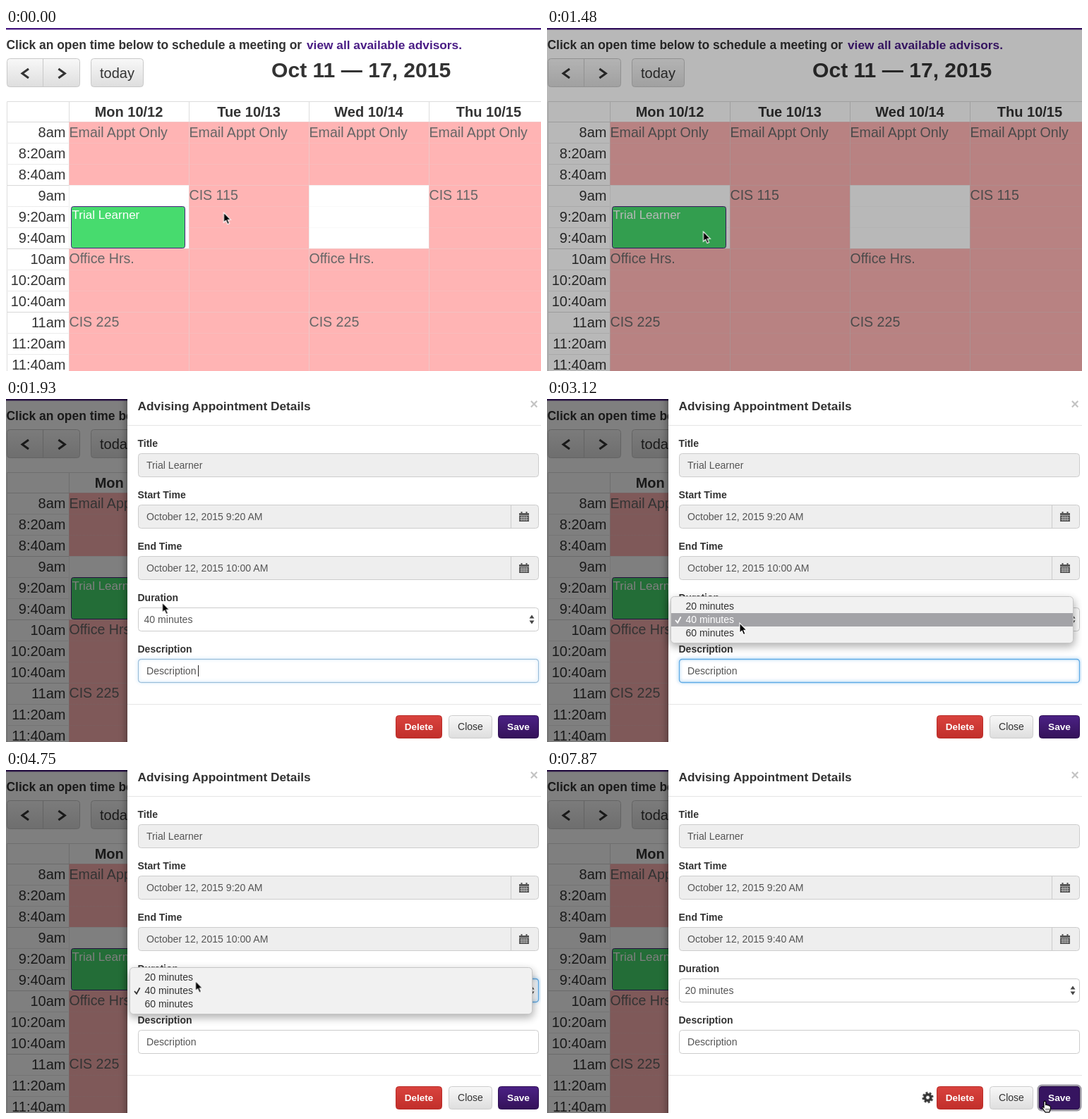
Recreate the animation shown at these times as an HTML page. Size 758 by 487 pixels, loop 8 s.

```html
<!DOCTYPE html>
<html lang="en">
<head>
<meta charset="utf-8">
<title>Advising calendar</title>
<style>
html, body { margin: 0; width: 100%; height: 100%; overflow: hidden; background: #fff; }
svg { display: block; width: 758px; height: 487px; font: 14px "Liberation Sans", Arial, sans-serif; }
text { fill: #333; white-space: pre; }
.b { font-weight: bold; }
.mid { text-anchor: middle; }
.end { text-anchor: end; }
.big { font-size: 20px; }
.busy { font-size: 19.6px; fill: #666; }
.value { font-size: 14.1px; fill: #555; }
.white text, text.white { fill: #fff; }

/* 54 ticks per 8 s loop; every part changes only on a tick */
.a { animation: 8s step-end -15ms infinite; }
#arrow { animation-name: arrow; }
#hand, #saveHover { animation-name: hover; }
#dim { animation-name: dim; }
#modal { animation-name: modal; }
#caret { animation-name: caret; }
#descRing { animation-name: descRing; }
#selRing { animation-name: selRing; }
#popup { animation-name: popup; }
#hi0 { animation-name: hi0; }
#hi1 { animation-name: hi1; }
#hi2 { animation-name: hi2; }
.old { animation-name: old; }
.new { animation-name: new; }
#saveRing { animation-name: saveRing; }
#gear { animation-name: gear; }
#cog { animation: spin 8s steps(54) -15ms infinite; }

@keyframes arrow {
  0% { transform: translate(308.5px, 262px); }
  1.85% { transform: translate(296px, 266px); }
  3.7% { transform: translate(263px, 277px); }
  5.56% { transform: translate(236px, 286px); }
  7.41% { transform: translate(223px, 290px); }
  9.26% { transform: translate(221.5px, 289px); }
  25.93% { transform: translate(228px, 293px); }
  27.78% { transform: translate(250px, 305px); }
  29.63% { transform: translate(268px, 316px); }
  31.48% { transform: translate(273px, 318px); }
  44.44% { transform: translate(272px, 324px); }
  46.3% { transform: translate(270px, 325px); }
  48.15% { transform: translate(270px, 318px); }
  50% { transform: translate(268px, 306px); }
  51.85% { transform: translate(268px, 301px); }
  53.7% { transform: translate(268.5px, 299.5px); }
  64.81% { transform: translate(310px, 318px); }
  66.67% { transform: translate(440px, 370px); }
  68.52% { transform: translate(590px, 430px); }
  70.37% { transform: translate(688px, 465px); }
  72.22% { transform: translate(704px, 470px); opacity: 1; }
  74.07%, 100% { transform: translate(704px, 470px); opacity: 0; }
}
@keyframes hover { 0% { opacity: 0; } 74.07%, 100% { opacity: 1; } }
@keyframes dim { 0% { opacity: 0; } 18.52% { opacity: .28; } 20.37%, 100% { opacity: .5; } }
@keyframes modal {
  0% { opacity: 0; transform: translateY(-122px); }
  20.37% { opacity: .6; transform: translateY(-60px); }
  22.22% { opacity: 1; transform: translateY(-8px); }
  24.07%, 100% { opacity: 1; transform: none; }
}
@keyframes caret { 0% { opacity: 0; } 24.07% { opacity: 1; } 31.48%, 100% { opacity: 0; } }
@keyframes descRing { 0% { opacity: 0; } 24.07% { opacity: .45; } 25.93% { opacity: 1; } 40.74%, 100% { opacity: 0; } }
@keyframes selRing { 0% { opacity: 0; } 40.74% { opacity: 1; } 83.33% { opacity: .5; } 85.19%, 100% { opacity: 0; } }
@keyframes popup { 0% { opacity: 0; } 38.89% { opacity: 1; } 62.96% { opacity: .5; } 64.81%, 100% { opacity: 0; } }
@keyframes hi0 { 0% { opacity: 0; } 51.85% { opacity: 1; } 59.26% { opacity: 0; } 61.11%, 100% { opacity: 1; } }
@keyframes hi1 { 0% { opacity: 1; } 44.44% { opacity: 0; } 48.15% { opacity: 1; } 51.85%, 100% { opacity: 0; } }
@keyframes hi2 { 0% { opacity: 0; } 44.44% { opacity: 1; } 48.15%, 100% { opacity: 0; } }
@keyframes old { 0% { opacity: 1; } 64.81%, 100% { opacity: 0; } }
@keyframes new { 0% { opacity: 0; } 64.81%, 100% { opacity: 1; } }
@keyframes saveRing { 0% { opacity: 0; } 83.33%, 100% { opacity: 1; } }
@keyframes gear { 0% { opacity: 0; } 85.19%, 100% { opacity: 1; } }
@keyframes spin { to { transform: rotate(1440deg); } }
</style>
</head>
<body>
<svg viewBox="0 0 758 487">
  <defs>
    <linearGradient id="grey" x2="0" y2="1"><stop stop-color="#f8f8f8"/><stop offset="1" stop-color="#dedede"/></linearGradient>
    <linearGradient id="red" x2="0" y2="1"><stop stop-color="#d9433e"/><stop offset="1" stop-color="#c12e2a"/></linearGradient>
    <linearGradient id="purple" x2="0" y2="1"><stop stop-color="#4b2185"/><stop offset="1" stop-color="#341259"/></linearGradient>
    <filter id="blur" x="-20%" y="-20%" width="140%" height="140%"><feGaussianBlur stdDeviation="6"/></filter>
    <filter id="soft" x="-10%" y="-40%" width="120%" height="180%"><feGaussianBlur stdDeviation="2"/></filter>
    <g id="calendar" fill="#555">
      <path d="M0 2H14V14H0Z"/>
      <path d="M2.5 0h2v3h-2zM9.5 0h2v3h-2z"/>
      <path d="M0 5.3H14M1 8.4H13M1 11.2H13M3.9 6V13M7 6V13M10.1 6V13" stroke="#eee" stroke-width=".6"/>
    </g>
    <g id="ring" fill="none">
      <rect x="187" width="567.5" height="33" rx="4" stroke="#66afe9" stroke-width="4" opacity=".35" filter="url(#soft)"/>
      <rect x="187.5" y=".5" width="567" height="33" rx="4" stroke="#5fabe6" stroke-width="1.3"/>
    </g>
    <path id="tick" d="M182 314l3 3.6 4.6-8.4" fill="none" stroke-width="1.8"/>
  </defs>

  <rect width="758" height="487" fill="#fff"/>
  <rect width="758" height="2.4" fill="#4b1f83"/>
  <g class="b">
    <text x=".5" y="30" font-size="17.45">Click an open time below to schedule a meeting or</text>
    <text x="426" y="30" font-size="17.3" style="fill:#4a1d85">view all available advisors.</text>
    <text x="376" y="70" font-size="30.1">Oct 11 — 17, 2015</text>
  </g>
  <g fill="url(#grey)" stroke="#c8c8c8">
    <rect x="1.5" y="43.5" width="103" height="40" rx="4"/>
    <rect x="120.5" y="43.5" width="74" height="40" rx="4"/>
    <path d="M52.5 44V83"/>
  </g>
  <path d="M32 58L23 64.5L32 71M74.4 58L83.4 64.5L74.4 71" fill="none" stroke="#333" stroke-width="3"/>
  <text class="big mid" x="157.5" y="71">today</text>

  <g id="grid"></g>

  <rect x="92.5" y="253.5" width="161" height="59" rx="3" fill="#47db6e" stroke="#4a1f7c"/>
  <text class="white" x="93.5" y="271" font-size="17">Trial Learner</text>

  <rect id="dim" class="a" width="758" height="487"/>

  <g id="modal" class="a">
    <rect x="172" y="-30" width="620" height="528" rx="6" opacity=".5" filter="url(#blur)" transform="translate(0 5)"/>
    <rect x="172" y="-30" width="620" height="528" rx="6" fill="#fff"/>
    <path d="M172 37.5H758M172 433.5H758" stroke="#e5e5e5"/>
    <text class="b" x="186.5" y="16" font-size="17.3">Advising Appointment Details</text>
    <text class="b mid" x="748" y="14" font-size="20" style="fill:#c4c4c4">×</text>
    <g id="fields"></g>

    <text class="value" x="199" y="99">Trial Learner</text>
    <text class="value" x="199" y="172">October 12, 2015 9:20 AM</text>
    <text class="value a old" x="199" y="245">October 12, 2015 10:00 AM</text>
    <text class="value a new" x="199" y="245">October 12, 2015 9:40 AM</text>
    <text class="value a old" x="195.5" y="318">40 minutes</text>
    <text class="value a new" x="195.5" y="318">20 minutes</text>
    <text class="value" x="199" y="391">Description</text>
    <path d="M741.5 311.5l3.5-5 3.5 5zM741.5 314.5l3.5 5 3.5-5z" fill="#444"/>
    <path id="caret" class="a" d="M272.5 378V394" stroke="#222"/>
    <g id="descRing" class="a"><use href="#ring" y="369"/></g>
    <g id="selRing" class="a"><use href="#ring" y="296"/></g>

    <g id="gear" class="a">
      <g transform="translate(539.5 465)">
        <g id="cog" fill="none" stroke="#333">
          <circle r="4.3" stroke-width="3.6"/>
          <circle r="6.7" stroke-width="2.6" stroke-dasharray="2.9 2.362"/>
        </g>
      </g>
    </g>

    <rect x="552.5" y="449.5" width="65" height="32" rx="4" fill="url(#red)" stroke="#b92c28"/>
    <rect x="627.5" y="449.5" width="61" height="32" rx="4" fill="url(#grey)" stroke="#ccc"/>
    <g id="saveRing" class="a">
      <rect x="696" y="448" width="60" height="35" rx="5" fill="none" stroke="#85818f" stroke-width="3" opacity=".8"/>
    </g>
    <rect x="697.5" y="449.5" width="57" height="32" rx="4" fill="url(#purple)" stroke="#2f1053"/>
    <rect id="saveHover" class="a" x="697.5" y="449.5" width="57" height="32" rx="4" fill="#361460" stroke="#260b47"/>
    <text class="b mid white" x="585" y="470" font-size="13.5">Delete</text>
    <text class="mid" x="658" y="470">Close</text>
    <text class="b mid white" x="726" y="470" font-size="13.7">Save</text>
  </g>

  <g id="popup" class="a">
    <rect x="174" y="284" width="574" height="68" rx="8" opacity=".3" filter="url(#blur)"/>
    <rect x="175.5" y="280.5" width="570" height="66" rx="5" fill="#f1f1f1" stroke="#c6c6c6"/>
    <use href="#tick" stroke="#333"/>
    <g id="options"></g>
  </g>

  <path id="arrow" class="a" d="M0 0V14.2L3.2 11.2L5.5 16.6L8 15.5L5.8 10.2H9.8Z" stroke="#fff" stroke-width="1.1"/>
  <g id="hand" class="a">
    <g transform="translate(701 469)" stroke="#000">
      <path d="M3 2.2q1.3-2 2.6 0V6.4q2-.9 2.6.6q1.8-.6 2.3.8q1.9-.2 1.9 1.7V12L10.9 16.8H5L.8 11q-.5-1.9 1-1.7L3 10.4Z" fill="#fff" stroke-width="1.2"/>
      <path d="M6 11.5v3M8 11.5v3M10 11.5v3" stroke-width=".7"/>
    </g>
  </g>
</svg>
<script>
const fill = (id, html) => { document.getElementById(id).innerHTML = html; };
const rect = (x, y, w, h, rest) => `<rect x="${x}" y="${y}" width="${w}" height="${h}" ${rest}/>`;
const text = (x, y, s, cls = "") => `<text x="${x}" y="${y}" class="${cls}">${s}</text>`;

// Calendar: a 30px row per 20 minutes, a 170px column per day
function grid() {
  const days = ["Mon 10/12", "Tue 10/13", "Wed 10/14", "Thu 10/15"];
  let pink = "", lines = "", labels = "";
  days.forEach((day, i) => {
    const x = 89 + i * 170, open = i % 2 === 0;
    const busy = (y, h) => rect(x, y, 170, h, 'fill="#ffb4b4"');
    pink += open ? busy(133, 90) + busy(313, 174) : busy(133, 354);
    lines += `<path d="M${x + .5} 104V133" stroke="#ddd"/><path d="M${x + .5} 133V487" stroke="#ddd" opacity=".5"/>`;
    labels += text(x + 85, 126, day, "b big mid") + text(x + .5, 155, "Email Appt Only", "busy");
    labels += open
      ? text(x + .5, 334, "Office Hrs.", "busy") + text(x + .5, 424, "CIS 225", "busy")
      : text(x + .5, 244, "CIS 115", "busy");
  });
  for (let r = 0; r < 12; r++) {
    const y = 133.5 + r * 30, part = r % 3;
    const dash = part ? 'stroke-dasharray="1 1"' : "";
    lines += `<path d="M1 ${y}H89" stroke="#d8d8d8" ${dash}/><path d="M89 ${y}H758" stroke="#ddd" opacity=".35" ${dash}/>`;
    labels += text(84.5, 155 + r * 30, 8 + (r - part) / 3 + ["", ":20", ":40"][part] + "am", "big end");
  }
  lines += '<path d="M1.5 487V104.5H758" fill="none" stroke="#ddd"/>';
  return pink + lines + labels;
}

function fields() {
  return ["Title", "Start Time", "End Time", "Duration", "Description"].map((name, i) => {
    const y = 77 + i * 73;
    const box = rect(187.5, y + .5, 567, 33, `rx="4" stroke="#ccc" fill="${i < 3 ? "#eee" : "#fff"}"`);
    const addon = i === 1 || i === 2
      ? `<path d="M715.5 ${y}v34" stroke="#ccc"/><use href="#calendar" x="727" y="${y + 10}"/>` : "";
    return text(186.5, y - 9, name, "b") + box + addon;
  }).join("");
}

// Each option is plain text with a highlighted copy on top
function options() {
  return [20, 40, 60].map((n, i) => {
    const label = text(196.5, 299 + i * 19, n + " minutes");
    const bar = rect(176, 285 + i * 19, 569, 19, 'fill="#a3a3a7"');
    const tick = i === 1 ? '<use href="#tick" stroke="#fff"/>' : "";
    return `${label}<g id="hi${i}" class="a white">${bar}${label}${tick}</g>`;
  }).join("");
}

fill("grid", grid());
fill("fields", fields());
fill("options", options());
</script>
</body>
</html>
```
